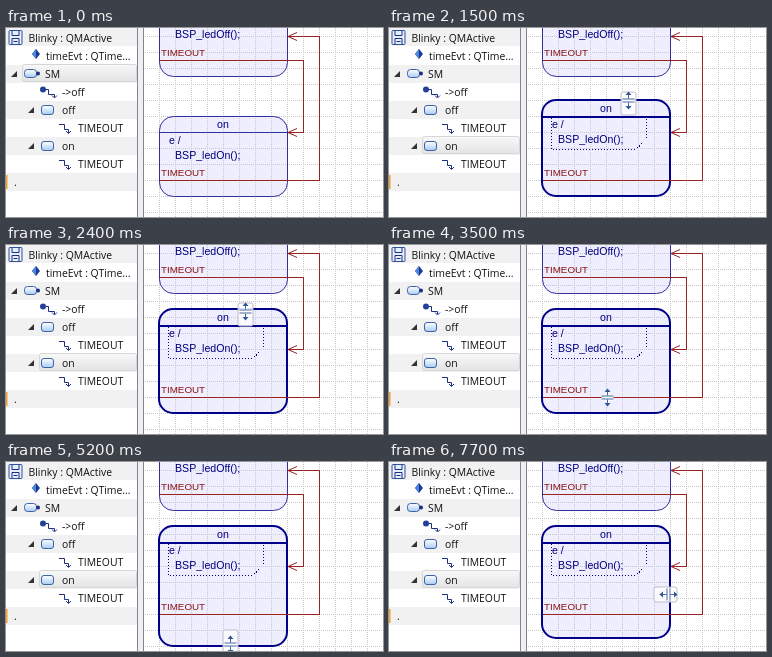
An HTML page that plays this animation: 377 px wide and 189 px high, repeating every 8000 ms.

```html
<!DOCTYPE html>
<html lang="en">
<head>
<meta charset="utf-8">
<title>Resizing a state</title>
<style>
  html, body { margin: 0; width: 100%; height: 100%; overflow: hidden; background: #fff; }
  svg { display: block; width: 377px; height: 189px; }
  .tree text { font: 10.4px "Open Sans", "Noto Sans", sans-serif; fill: #111; }
  .diagram text { font: 10.6px "Liberation Sans", Arial, sans-serif; fill: #000080; }
  .diagram .trigger { font-size: 9.8px; fill: #8b1414; }
  .wire { fill: none; stroke: #992222; }
  .state { fill: rgba(200, 200, 255, .3); stroke: #30309c; }
  .thin { fill: none; stroke: #30309c; }
  .selected .state, .selected .thin { stroke: #00008a; stroke-width: 2; }
  .dotted { fill: none; stroke: #000080; stroke-dasharray: 1 2; visibility: hidden; }
  .selected .dotted { visibility: visible; }
  .node { fill: none; stroke: #1c2f80; }
  .crisp { shape-rendering: crispEdges; }
</style>
</head>
<body>
<svg viewBox="0 0 377 189">
  <defs>
    <pattern id="grid" x="153" y="8" width="16" height="16" patternUnits="userSpaceOnUse">
      <path class="crisp" d="M0 .5H16M.5 0V16" stroke="#c6c6c6" stroke-dasharray="1 1"/>
    </pattern>
    <linearGradient id="pick" x2="0" y2="1">
      <stop stop-color="#f8f8f8"/><stop offset="1" stop-color="#e4e4e4"/>
    </linearGradient>
    <linearGradient id="sky" x2="0" y2="1">
      <stop stop-color="#fff"/><stop offset="1" stop-color="#a9ccf2"/>
    </linearGradient>

    <!-- tree icons, centred vertically on the row -->
    <g id="machine">
      <rect x=".5" y="-7.5" width="13" height="14" rx="1" fill="#e6eefb" stroke="#31509a"/>
      <path class="node" d="M3.5 -7V-2.5H10.5V-7M3.5 6V.5H10.5V6M5 3.5H9"/>
    </g>
    <g id="attribute">
      <path d="M10 -7L14 -2L10 3L6 -2Z" fill="#17389a"/>
      <path d="M10 -7L10 3L6 -2Z" fill="#4f86d8"/>
    </g>
    <g id="chart">
      <rect x="-.5" y="-4.5" width="12" height="8" rx="3" fill="url(#sky)" stroke="#3d62a8"/>
      <circle cx="13" cy="-.5" r="2" fill="#1c2f80"/>
    </g>
    <g id="initial">
      <circle cx="1" cy="-2.5" r="3" fill="#23409a"/>
      <path class="node" d="M4 -2.5H6.5V2.5H12.5V5M10 3.5L12.5 6L15 3.5"/>
    </g>
    <rect id="state" x="-.5" y="-4.5" width="12" height="9" rx="2.5" fill="url(#sky)" stroke="#3d62a8"/>
    <path id="transition" class="node" d="M1 -3.5H6.5V1.5H10.5V5M8 3L10.5 5.5L13 3"/>

    <g id="split">
      <path d="M-6 -1.5H6M-6 1.5H6M0 -7V7" stroke="#fff" stroke-width="3"/>
      <path d="M-6 -1.5H6M-6 1.5H6M0 -7V-2M0 2V7" stroke="#46659c"/>
      <path d="M0 -9L3 -5.5H-3ZM0 9L3 5.5H-3Z" fill="#2f5596"/>
    </g>
    <path id="arrow" d="M.5 .5V16L4 12.7L6.4 18.2L9 17L6.7 11.7H11.5Z" fill="#fff" stroke="#111"/>
  </defs>

  <g class="diagram">
    <rect x="138" width="239" height="189" fill="#fff"/>
    <rect x="138" width="239" height="189" fill="url(#grid)"/>
    <rect class="state" x="153.5" y="-40.5" width="128" height="89" rx="14"/>
    <text x="169" y="10">BSP_ledOff();</text>
    <text class="trigger" x="155" y="27.5">TIMEOUT</text>
    <g id="box">
      <rect id="body" class="state" width="128" rx="14"/>
      <g id="content">
        <text x="217" y="12" text-anchor="middle">on</text>
        <path class="thin crisp" d="M154 16.5H281"/>
        <path class="dotted crisp" d="M162.5 17.5H257.5V39.5L246.5 49.5H162.5Z"/>
        <text x="163" y="28">e /</text>
        <text x="169" y="42.5">BSP_ledOn();</text>
      </g>
    </g>
    <text class="trigger" x="155" y="148">TIMEOUT</text>
    <path class="wire crisp" d="M154 32.5H297.5V104.5H282M154 152.5H313.5V8.5H282"/>
    <path class="wire" d="M291 100.5L282 104.5L291 108.5M291 4.5L282 8.5L291 12.5"/>
  </g>

  <g class="tree" id="tree">
    <rect width="131" height="189" fill="#fff"/>
    <path d="M0 9H131M0 46H131M0 82H131M0 118H131M0 154H131" stroke="#f1f1f1" stroke-width="18"/>
    <rect id="pickRow" height="17" rx="2" fill="url(#pick)" stroke="#d6d6d6"/>
    <rect y="147" width="1.5" height="14" fill="#f0a030"/>
    <rect x="131" width="7" height="189" fill="#f0f0f0"/>
    <path class="crisp" d="M131.5 0V189M137.5 0V189" stroke="#80858f"/>
  </g>

  <rect id="handle" rx="2" fill="#fff" fill-opacity=".75" stroke="#bdbdc8"/>
  <use id="cursor"/>
</svg>
<script>
const LOOP = 8000, TICK = 100, ROW = 18, SNAP = 8;

const rows = [
  { text: "Blinky : QMActive", x: 22.5, icon: "machine" },
  { text: "timeEvt : QTime...", x: 40, icon: "attribute" },
  { text: "SM", x: 39, icon: "chart", open: true },
  { text: "->off", x: 56, icon: "initial" },
  { text: "off", x: 56, icon: "state", open: true },
  { text: "TIMEOUT", x: 72, icon: "transition" },
  { text: "on", x: 56, icon: "state", open: true },
  { text: "TIMEOUT", x: 72, icon: "transition" },
  { text: ".", x: 8 }
];

// each move eases out from wherever the pointer was
const moves = [
  { from: 0, to: 800, x: 239, y: 89 },
  { from: 1300, to: 2000, x: 239, y: 59 },
  { from: 2100, to: 2400, x: 239, y: 66 },
  { from: 3100, to: 3800, x: 215, y: 164 },
  { from: 3900, to: 4400, x: 221, y: 165 },
  { from: 4700, to: 5200, x: 224, y: 182 },
  { from: 5800, to: 6000, x: 225, y: 177 },
  { from: 6500, to: 7400, x: 279, y: 132 }
];
const modes = [[0, "none"], [100, "arrow"], [800, "top"], [3200, "arrow"], [3500, "split"],
  [4400, "bottom"], [6600, "arrow"], [7300, "side"]];
// direction from the grabbed edge into the state
const inward = { top: [0, 1], bottom: [0, -1], side: [-1, 0] };

const $ = id => document.getElementById(id);
const clamp = (v, lo, hi) => Math.min(hi, Math.max(lo, v));
const easeOut = k => 1 - (1 - k) ** 2.5;

function set(node, attrs) {
  for (const name in attrs) node.setAttribute(name, attrs[name]);
  return node;
}

function add(tag, attrs) {
  return $("tree").appendChild(set(document.createElementNS("http://www.w3.org/2000/svg", tag), attrs));
}

rows.forEach(({ text, x, icon, open }, i) => {
  const y = ROW * i + 10;
  if (open) add("path", { d: `M${x - 28} ${y - 3}v6h-6z`, fill: "#333" });
  if (icon) add("use", { href: "#" + icon, x: x - 20, y });
  add("text", { x, y: y + 4 }).textContent = text;
});

function pointer(t) {
  let x = 0, y = 0;
  for (const m of moves) {
    const k = easeOut(clamp((t - m.from) / (m.to - m.from), 0, 1));
    x += (m.x - x) * k;
    y += (m.y - y) * k;
  }
  return [Math.round(x), Math.round(y)];
}

// the grabbed edge follows the pointer in grid steps
const topEdge = t => SNAP * Math.floor(pointer(clamp(t, 1200, 3100))[1] / SNAP);
const bottomEdge = t => SNAP * Math.round((pointer(clamp(t, 4400, 6500))[1] + 1) / SNAP);

function draw(t) {
  const selected = t >= 1200, top = topEdge(t), bottom = bottomEdge(t);
  const shift = selected ? 0 : .5;
  set($("box"), { class: selected ? "selected" : "" });
  set($("body"), { x: 153 + shift, y: top + shift, height: bottom - top });
  set($("content"), { transform: `translate(0 ${top})` });

  const picked = selected ? 6 : 2, left = rows[picked].x - 22.5;
  set($("pickRow"), { x: left, y: ROW * picked + .5, width: 130.5 - left });

  const mode = modes.filter(m => m[0] <= t).pop()[1];
  const [x, y] = pointer(t), dir = inward[mode], pixel = mode === "arrow" ? 0 : .5;
  set($("cursor"), {
    href: mode === "arrow" ? "#arrow" : "#split",
    visibility: mode === "none" ? "hidden" : "visible",
    transform: `translate(${x + pixel} ${y + pixel}) rotate(${mode === "side" ? 90 : 0})`
  });
  set($("handle"), { visibility: dir ? "visible" : "hidden" });
  if (dir) {
    const [w, h] = dir.map(d => 15 + 8 * Math.abs(d));
    set($("handle"), { x: x + 3 * dir[0] - w / 2 + .5, y: y + 3 * dir[1] - h / 2 + .5, width: w, height: h });
  }
}

const start = performance.now();
function frame() {
  const t = (performance.now() - start) % LOOP;
  draw(Math.floor(t / TICK) * TICK);
  requestAnimationFrame(frame);
}
frame();
</script>
</body>
</html>
```
